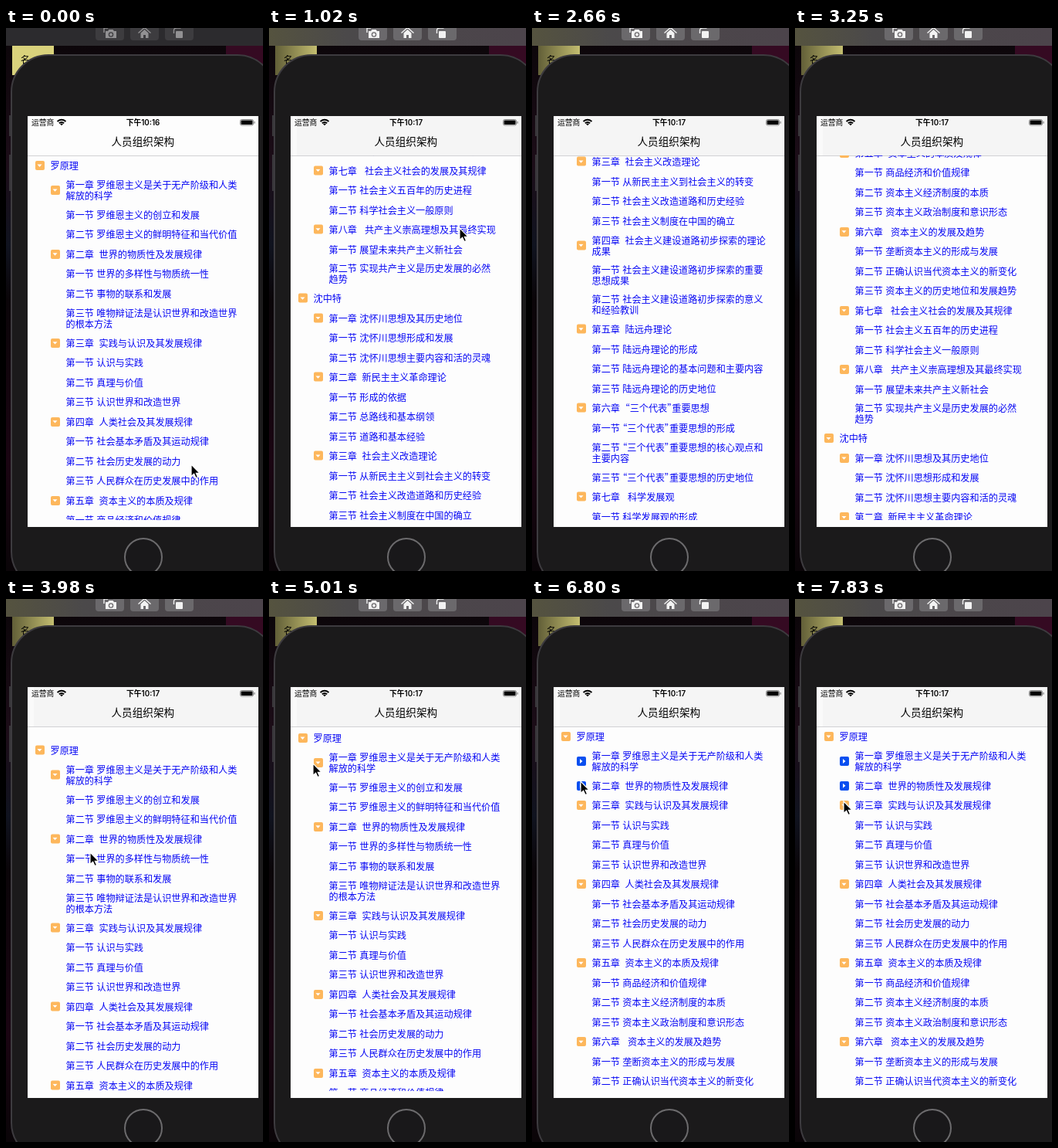
Recreate the animation shown at these times as an HTML page. Size 333 px wide and 703 px high, loop 8 s.

```html
<!DOCTYPE html>
<html lang="zh-CN">
<head>
<meta charset="utf-8">
<title>人员组织架构</title>
<style>
html, body { margin: 0; width: 100%; height: 100%; overflow: hidden; background: #0a0508; }
body { font-family: "Noto Sans CJK SC", "Noto Sans CJK", sans-serif; }
#stage { position: relative; width: 333px; height: 703px; overflow: hidden; }
#stage > * { position: absolute; }
svg { left: 0; top: 0; }
#stage { --key: #6b696c; --glyph: #f2f2f2; --nav: #f5f5f5; --edge: #fafafa; --shade: 1; }
#stage.idle { --key: #3d3c3f; --glyph: #929193; --nav: #fdfdfd; --edge: #fdfdfd; --shade: 0; }
#clock { font-family: Inter, "Noto Sans CJK SC", "Noto Sans CJK", sans-serif; }
#view { left: 28px; top: 165px; width: 299px; height: 472px; overflow: hidden; }
#list { padding-top: .25px; }
.row { position: relative; height: 25.5px; display: flex; align-items: center; padding-left: 49.5px;
  font-size: 12.15px; word-spacing: .6px; line-height: 14px; white-space: pre; color: #0808f4; font-feature-settings: "halt"; }
.row.tall { height: 38.3px; }
.row.root { padding-left: 29.5px; }
.row.hidden { display: none; }
.icon { position: absolute; left: 29.5px; top: calc(50% - 6px); width: 12px; height: 12px; border-radius: 2px; background: #fdb75c; }
.root .icon { left: 9.5px; }
.icon::after { content: ""; position: absolute; inset: 0; background: #fff; clip-path: polygon(25% 38%, 75% 38%, 50% 66%); }
.closed .icon { background: #0a4ff0; }
.closed .icon::after { clip-path: polygon(38% 25%, 66% 50%, 38% 75%); }
</style>
</head>
<body>
<div id="stage">
  <svg width="333" height="703">
    <defs>
      <linearGradient id="wall" x2="0" y2="1">
        <stop offset="0" stop-color="#0a0508"/><stop offset=".25" stop-color="#1c0d18"/>
        <stop offset=".4" stop-color="#10131f"/><stop offset=".5" stop-color="#0a0508"/>
        <stop offset=".8" stop-color="#1a0512"/><stop offset="1" stop-color="#0a0508"/>
      </linearGradient>
      <linearGradient id="bar">
        <stop offset="0" stop-color="#55533f"/><stop offset=".3" stop-color="#4b494a"/>
        <stop offset="1" stop-color="#4c444b"/>
      </linearGradient>
      <linearGradient id="shadow">
        <stop offset="0" stop-opacity=".55"/><stop offset="1" stop-opacity=".1"/>
      </linearGradient>
    </defs>
    <rect width="333" height="703" fill="url(#wall)"/>
    <rect x="285" y="23" width="48" height="30" fill="#350a22"/>
    <rect x="8" y="23" width="54" height="38" fill="#d9d27c"/>
    <text x="19" y="46" font-size="12">名</text>
    <rect width="333" height="23" fill="#2c2b2e"/>
    <g style="opacity:var(--shade)">
      <rect x="8" y="23" width="54" height="38" fill="url(#shadow)"/>
      <rect width="333" height="23" fill="url(#bar)"/>
    </g>
    <g style="fill:var(--key)">
      <rect x="116" y="-8" width="37" height="24" rx="4"/>
      <rect x="161" y="-8" width="37" height="24" rx="4"/>
      <rect x="206" y="-8" width="37" height="24" rx="4"/>
    </g>
    <g style="fill:var(--glyph)">
      <path d="M129 4h3l1.500-2h5l1.500 2h3v9h-14z"/>
      <path d="M174.500 6.500l5-4.500 5 4.500V13H181V9h-3v4h-3.500z"/>
      <rect x="220" y="4" width="9" height="9" rx="1"/>
    </g>
    <circle cx="136" cy="8.500" r="2.600" style="fill:var(--glyph);stroke:var(--key)" stroke-width="1.300"/>
    <g fill="none" style="stroke:var(--glyph)" stroke-width="1.400">
      <path d="M127 6V0h5"/>
      <path d="M171.500 6.500l8-7 8 7"/>
      <path d="M217.500 7V3q0-3 4-3h5"/>
    </g>
    <g fill="#38363a">
      <rect x="4" y="113" width="4" height="27"/>
      <rect x="4" y="164" width="4" height="47"/>
    </g>
    <rect x="7" y="35" width="341" height="691" rx="48" fill="#1b1a1b" stroke="#3d3b3f" stroke-width="2"/>
    <circle cx="178" cy="685" r="24" fill="#19181a" stroke="#6c6b6d" stroke-width="2"/>
    <rect x="28" y="114" width="299" height="532" fill="#fdfdfd"/>
    <rect x="28" y="114" width="8" height="51" style="fill:var(--edge)"/>
    <rect x="36" y="114" width="291" height="51" style="fill:var(--nav)"/>
    <rect x="28" y="165" width="299" height="1" fill="#d2d2d4"/>
    <text x="33" y="126" font-size="9.800">运营商</text>
    <g fill="none" stroke="#000" stroke-width="1.800">
      <path d="M66.500 121q5.500-4.500 11 0M68.800 123.300q3.200-2.600 6.400 0"/>
    </g>
    <path d="M70 124.300q2-1.400 4 0l-2 2z"/>
    <text id="clock" x="177.500" y="126" font-size="9.800" font-weight="600" text-anchor="middle"></text>
    <rect x="303.500" y="118.500" width="17" height="7.500" rx="2" fill="none" stroke="#888"/>
    <rect x="304.500" y="119.500" width="15" height="5.500" rx="1"/>
    <rect x="321.500" y="120.800" width="1.200" height="3" rx=".6" fill="#888"/>
    <text x="177.300" y="152" font-size="13.600" font-weight="500" text-anchor="middle">人员组织架构</text>
  </svg>
  <div id="view"><div id="list"></div></div>
  <svg id="cursor" width="16" height="22" viewBox="-1.500 -1.500 16 22">
    <path d="M0 0V15.500L3.600 12.200 6 17.600 8.600 16.500 6.300 11.300H11Z" stroke="#fff" stroke-width="1.200"/>
  </svg>
</div>
<script>
// One row per line; "/" marks a line break inside a row.
const outline = `罗原理
第一章 罗维恩主义是关于无产阶级和人类/解放的科学
第一节 罗维恩主义的创立和发展
第二节 罗维恩主义的鲜明特征和当代价值
第二章  世界的物质性及发展规律
第一节 世界的多样性与物质统一性
第二节 事物的联系和发展
第三节 唯物辩证法是认识世界和改造世界/的根本方法
第三章  实践与认识及其发展规律
第一节 认识与实践
第二节 真理与价值
第三节 认识世界和改造世界
第四章  人类社会及其发展规律
第一节 社会基本矛盾及其运动规律
第二节 社会历史发展的动力
第三节 人民群众在历史发展中的作用
第五章  资本主义的本质及规律
第一节 商品经济和价值规律
第二节 资本主义经济制度的本质
第三节 资本主义政治制度和意识形态
第六章   资本主义的发展及趋势
第一节 垄断资本主义的形成与发展
第二节 正确认识当代资本主义的新变化
第三节 资本主义的历史地位和发展趋势
第七章   社会主义社会的发展及其规律
第一节 社会主义五百年的历史进程
第二节 科学社会主义一般原则
第八章   共产主义崇高理想及其最终实现
第一节 展望未来共产主义新社会
第二节 实现共产主义是历史发展的必然/趋势
沈中特
第一章 沈怀川思想及其历史地位
第一节 沈怀川思想形成和发展
第二节 沈怀川思想主要内容和活的灵魂
第二章  新民主主义革命理论
第一节 形成的依据
第二节 总路线和基本纲领
第三节 道路和基本经验
第三章  社会主义改造理论
第一节 从新民主主义到社会主义的转变
第二节 社会主义改造道路和历史经验
第三节 社会主义制度在中国的确立
第四章  社会主义建设道路初步探索的理论/成果
第一节 社会主义建设道路初步探索的重要/思想成果
第二节 社会主义建设道路初步探索的意义/和经验教训
第五章  陆远舟理论
第一节 陆远舟理论的形成
第二节 陆远舟理论的基本问题和主要内容
第三节 陆远舟理论的历史地位
第六章  “三个代表”重要思想
第一节 “三个代表”重要思想的形成
第二节 “三个代表”重要思想的核心观点和/主要内容
第三节 “三个代表”重要思想的历史地位
第七章   科学发展观
第一节 科学发展观的形成
第二节 科学发展观的主要内容
第三节 科学发展观的历史地位
第八章   新时代的发展与历史方位
第一节 新时代的主要矛盾
第二节 新时代的主要内容
第三节 新时代的历史地位
第九章   总任务与总体布局
第一节 建设现代化强国
第二节 总体布局的主要内容`;

const LOOP = 8000, STEP = 147.7, LAST = 53;
// Tracks are [step, ...values], linear in between.
const scrollTrack = [[1, 0], [2, 25], [3, 95], [4, 200], [5, 335], [6, 480], [7, 631.5], [8, 825],
  [9, 970], [10, 1075], [11, 1150], [12, 1200], [13, 1225], [14, 1225], [15, 1205], [16, 1155],
  [17, 1090], [18, 1012.5], [22, 450], [25, 75], [27, -17.5], [28, -45], [29, -56], [30, -50],
  [31, -34], [32, -18], [33, -7], [34, -2], [35, 0]];
const cursorTrack = [[2, 240, 565], [4, 243, 450], [7, 247, 259], [8, 248, 215],
  [23, 120, 250], [27, 109, 328], [30, 100, 325], [34, 57, 213], [38, 57, 212], [39, 62, 208],
  [41, 62, 208], [44, 63, 236], [46, 63, 236], [49, 42, 175], [51, 48, 200], [53, 63, 262]];
const closings = [41, 46]; // steps at which the first chapters fold

const $ = id => document.getElementById(id);
const stage = $("stage"), list = $("list"), cursor = $("cursor"), clock = $("clock");

let chapter = -1;
const rows = outline.split("\n").map(line => {
  const el = document.createElement("div");
  const kind = /^第.章/.test(line) ? "chapter" : /^第.节/.test(line) ? "leaf" : "root";
  if (kind === "chapter") chapter++;
  el.className = "row " + kind + (line.includes("/") ? " tall" : "");
  el.textContent = line.replace("/", "\n");
  if (kind !== "leaf") el.appendChild(document.createElement("i")).className = "icon";
  list.append(el);
  return { el, kind, chapter };
});

function sample(track, s) {
  const i = track.findIndex(key => key[0] >= s);
  if (i < 0) return track[track.length - 1].slice(1);
  if (i === 0) return track[0].slice(1);
  const a = track[i - 1], b = track[i], f = (s - a[0]) / (b[0] - a[0]);
  return a.slice(1).map((v, j) => v + (b[j + 1] - v) * f);
}

function draw(now) {
  const step = Math.min(LAST, Math.floor((now % LOOP + 14) / STEP));
  const [scroll] = sample(scrollTrack, step), [x, y] = sample(cursorTrack, step);
  stage.classList.toggle("idle", step < 1);
  clock.textContent = step < 3 ? "下午10:16" : "下午10:17";
  list.style.transform = `translateY(${-scroll}px)`;
  cursor.style.transform = `translate(${x - 1.5}px, ${y - 1.5}px)`;
  cursor.style.visibility = step > 8 && step < 23 ? "hidden" : "visible";
  for (const { el, kind, chapter } of rows) {
    const closed = step >= closings[chapter];
    el.classList.toggle("closed", closed && kind === "chapter");
    el.classList.toggle("hidden", closed && kind === "leaf");
  }
}

const start = performance.now();
function tick() {
  draw(performance.now() - start);
  requestAnimationFrame(tick);
}
tick();
</script>
</body>
</html>
```
